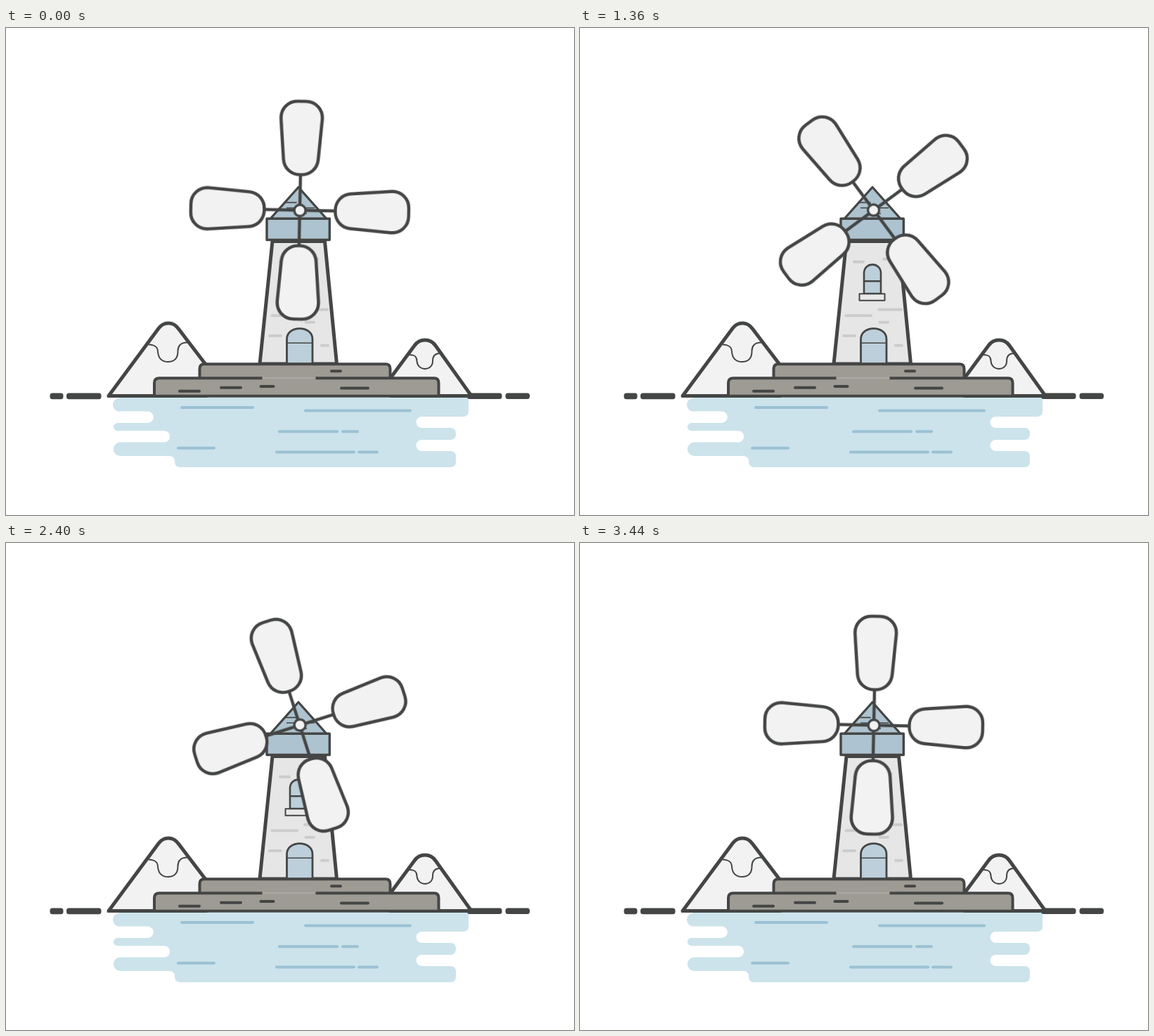
Animation, 808 px wide and 693 px high, one loop 3480 ms. Source, as an HTML page:

```html
<!DOCTYPE html>
<html lang="en">
<head>
<meta charset="utf-8">
<title>Windmill</title>
<style>
html, body { margin: 0; width: 100%; height: 100%; overflow: hidden; background: #fff; }
svg { display: block; width: 808px; height: 693px; }
.ink { stroke: #444645; stroke-linejoin: round; }
.none { fill: none; }
.pale { fill: #f2f2f2; }
.stone { fill: #9e9b94; }
.roof { fill: #adc3cf; }
.glass { fill: #bccfda; }
.dash { fill: none; stroke-linecap: round; stroke-width: 4; }
/* one turn in 86 steps, then a single held step */
.sails { animation: turn 3480ms infinite; }
@keyframes turn {
  0% { transform: rotate(1.2deg); animation-timing-function: steps(86, end); }
  98.8506% { transform: rotate(361.2deg); }
  100% { transform: rotate(361.2deg); }
}
</style>
</head>
<body>
<svg viewBox="0 0 808 693">
  <defs>
    <g id="sail">
      <path d="M0-8V-51" stroke-width="4.5"/>
      <path class="pale" stroke-width="4.6" d="M-6-155H6C20-155 30.500-143.500 29.300-129L24.700-72C23.500-59 13-50.500 1-50.500H-1C-13-50.500-23.500-59-24.700-72L-29.300-129C-30.500-143.500-20-155-6-155Z"/>
    </g>
  </defs>

  <!-- water -->
  <path fill="#cce3eb" d="M162 526H658V545Q658 553 650 553H591.500A8 8 0 0 0 591.500 569H632Q640 569 640 577.500T632 586H591.500A8 8 0 0 0 591.500 602H632Q640 602 640 610V617Q640 625 632 625H248Q240 625 240 617Q240 609 232 609H162.500A9.700 9.700 0 0 1 162.500 589.600H225A8.200 8.200 0 0 0 225 573.200H158.500A5.600 5.600 0 0 1 158.500 562H201.500A8.200 8.200 0 0 0 201.500 545.600H162.500A9.700 9.700 0 0 1 155 529Z"/>
  <path class="dash" stroke="#9bc1d3" d="M250 540H351M426 544.500H575M389 574.200H471M479 574.200H500M245 597.800H296M385 603.500H495M502 603.500H528"/>

  <!-- mountains -->
  <g class="ink pale">
    <path stroke-width="5" d="M146 523.500L217 427.500Q222.500 420 231 420T245 427.500L285 480V523.500Z"/>
    <path stroke-width="5" d="M547 498L581 452Q586.500 444 596 444T611 452L662 523.500H547Z"/>
    <path class="none" stroke-width="2" d="M203 450.500C212 451 216 454 216 461C217 471 223 475 230.500 475S244 471 244.500 461C244 453 248 447.500 258 447.500M574 465C582 465 584.500 468 584.500 474C585 481 590 485 596 485S607 481 607 474C607 467 610 463 617 463"/>
  </g>

  <!-- tower -->
  <path class="ink" fill="#e6e6e6" stroke-width="5" d="M379 303.500H453.500L470.500 478H361Z"/>
  <path class="dash" stroke="#ccc" d="M390 332.700H403M432 328.700H443M425 400.700H457M378.500 409.300H414M426.500 418.700H438M375 438H391M449 451.700H458"/>
  <g class="ink">
    <path class="glass" stroke-width="2.600" d="M404 378V349C404 332.500 428 332.500 428 349V378ZM404 360.300H428"/>
    <path fill="#e9e9e9" stroke-width="2" d="M397.500 378.300H433.500V387.700H397.500Z"/>
    <path class="glass" stroke-width="2.800" d="M399.500 478V443C399.500 422.500 436 422.500 436 443V478Z"/>
    <path stroke-width="1.600" d="M400 448.300H436"/>
    <path stroke-width="5" d="M377 303H455"/>
    <path class="roof" stroke-width="3.200" d="M416 226.500L376 271.500H456Z"/>
    <path class="roof" stroke-width="3.400" d="M371 271.300H460.300V301.500H371Z"/>
    <path stroke-width="1.700" d="M397 248.300H413.500M399 256H411M426 256H439M423 264H428"/>
  </g>

  <!-- island -->
  <g class="ink stone">
    <path stroke-width="4" d="M275.500 498V485Q275.500 478.300 282 478.300H540Q546.500 478.300 546.500 485V498"/>
    <path stroke="none" d="M211 524V505Q211 498 218 498H609Q616 498 616 505V524Z"/>
    <path class="none" stroke-width="4" d="M211 524V505Q211 498.300 218 498.300H364.500M440.500 498.300H609Q615.500 498.300 615.500 505V524"/>
  </g>
  <path stroke="#b9b7b2" stroke-width="1" d="M365 498H440"/>
  <path class="ink dash" d="M463 488.300H476M247 516.800H275M306 511.800H334M362.500 510H380.500M477 512.400H515"/>

  <!-- shore -->
  <path class="ink" stroke-width="4" d="M144 523.800H663"/>
  <g fill="#444645">
    <rect x="62.500" y="519.500" width="19" height="8.800" rx="3.500"/>
    <rect x="86" y="519.500" width="49.500" height="8.800" rx="3.500"/>
    <rect x="656" y="519.500" width="49.500" height="8.600" rx="3.500"/>
    <rect x="710.500" y="519.500" width="34.500" height="8.600" rx="3.500"/>
  </g>

  <g class="ink" transform="translate(417.900 259.300)">
    <g class="sails">
      <use href="#sail"/>
      <use href="#sail" transform="rotate(90)"/>
      <use href="#sail" transform="rotate(180)"/>
      <use href="#sail" transform="rotate(270)"/>
      <circle class="pale" cx=".2" cy=".3" r="8" stroke-width="3.400"/>
    </g>
  </g>
</svg>
</body>
</html>
```
